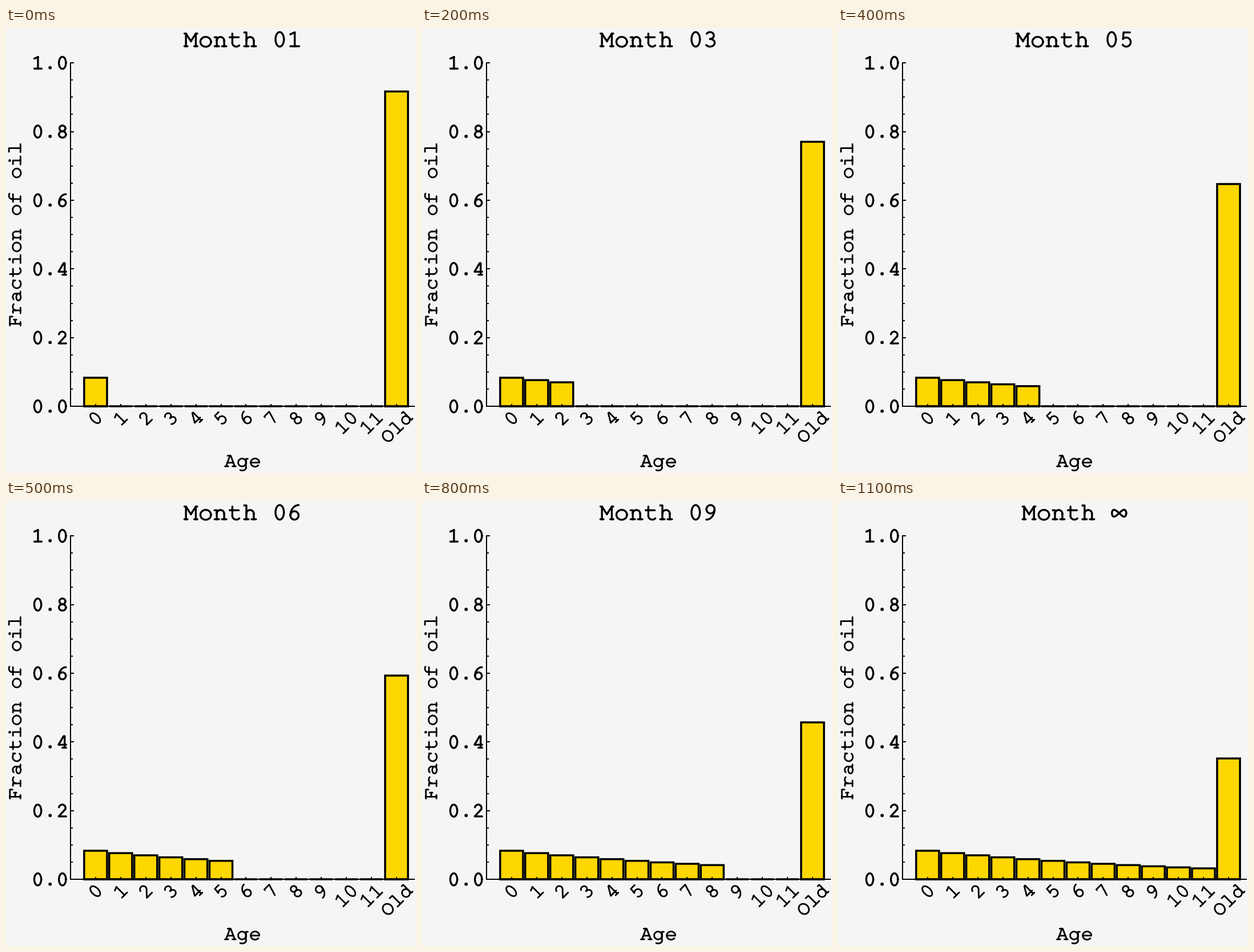
A matplotlib script for the animation above (2100 ms loop, 718x780 px).

```python
import numpy as np
import matplotlib.pyplot as plt
from matplotlib.animation import FuncAnimation
from matplotlib.patches import PathPatch, Rectangle
from matplotlib.path import Path

W, H, DPI = 718, 780, 100
PX = 72 / DPI
INK, GOLD, PAPER = "black", "#ffd700", "#f5f5f5"
LEFT, RIGHT, TOP, BASE = 113, 716, 61.1, 663.2
FIRST, STEP, HALF, EDGE = 156.9, 43.92, 20.05, 3.5
MID = (LEFT + RIGHT) / 2
MONTHS = 12
KEEP = 11 / 12

# Typewriter lettering: one round pen, stems, slabs and ellipse arcs.
# Units are 1/100 em; every cell is 60 wide.
CELL, MIDDLE = 60, 30
FOOT, XH, CAP, ASC = 3.5, 40, 55, 59.5


def line(*pts):
    return [np.array(pts, float)]


def slab(x0, x1, y=FOOT):
    return line((x0, y), (x1, y))


def arc(cx, cy, rx, ry, start=0, stop=360):
    t = np.radians(np.linspace(start, stop, 49))
    return [np.column_stack([cx + rx * np.cos(t), cy + ry * np.sin(t)])]


def stem(x, top, flag=9, foot=9):
    """Upright with a flag to the left of its top and a slab foot."""
    return line((x - flag, top), (x, top), (x, FOOT)) + slab(x - foot, x + foot)


def arch():
    return arc(MIDDLE, 26, 15, 15, 180, 0) + stem(45, 26, 0)


def half_turn(strokes):
    return [np.array([CELL, 63]) - s for s in strokes]


def infinity():
    t = np.linspace(0, 2 * np.pi, 97)
    return [np.column_stack([35 + 29 * np.cos(t), 28 + 14 * np.sin(2 * t)])]


six = arc(MIDDLE, 19, 16.5, 17) + arc(47, 19, 33.5, 42, 180, 90)
digits = {
    "0": arc(MIDDLE, 31.5, 17, 29.5),
    "1": stem(31, 60, 0, 18) + line((13, 52), (31, 60)),
    "2": arc(29, 45, 16, 16, 170, -40) + line((41, 35), (12, FOOT), (48, FOOT)),
    "3": arc(28, 47, 15.5, 14, 150, -90) + arc(28, 17.5, 19, 15.5, 90, -145),
    "4": line((41, FOOT), (41, 60), (36, 60), (11, 18), (48, 18)) + slab(MIDDLE, 48),
    "5": line((44, ASC), (18, ASC), (16, 33)) + arc(29, 20.5, 18, 18.5, 135, -145),
    "6": six,
    "7": line((13, CAP), (13, ASC), (47, ASC), (MIDDLE, FOOT)),
    "8": arc(MIDDLE, 47, 14.5, 14) + arc(MIDDLE, 17.5, 17, 15.5),
    "9": half_turn(six),
}

half_m = stem(10, CAP, 6, 6.5) + line((10, CAP), (MIDDLE, 24))
mirror = [s * [-1, 1] + [CELL, 0] for s in half_m]
capitals = {
    "M": half_m + mirror,
    "A": line((17, CAP), (32, CAP), (51, FOOT)) + line((28, CAP), (9, FOOT))
         + slab(16, 45, 21) + slab(FOOT, 20) + slab(40, 56),
    "F": stem(16, CAP) + line((16, CAP), (51, CAP), (51, 42))
         + slab(16, 36, 29) + line((36, 36), (36, 23)),
    "O": arc(MIDDLE, 29, 23, 26.5),
}

small = {
    "a": arc(27, 28, 16, 13, 140, 0) + line((43, 28), (43, FOOT), (53, FOOT))
         + arc(26, 13, 17, 11),
    "c": arc(MIDDLE, 21.5, 21, 20, 35, 320) + line((47, XH), (47, 29)),
    "d": arc(27, 21.5, 18.5, 19.5) + line((36, ASC), (46, ASC), (46, FOOT), (55, FOOT)),
    "e": arc(MIDDLE, 21.5, 21, 20, 0, 320) + slab(9, 51, 21.5),
    "f": stem(23, 46, 0, 14) + arc(40, 46, 17, 13.5, 180, 55) + slab(9, 47, XH),
    "g": arc(27, 22, 19, 19) + line((CAP, XH), (46, XH), (46, -3))
         + arc(28, -3, 18, 14, 0, -125),
    "h": stem(15, ASC) + arch(),
    "i": stem(31, XH, 18, 20) + arc(MIDDLE, 56, 2.5, 2.5),
    "l": stem(31, ASC, 18, 20),
    "n": stem(15, XH) + arch(),
    "o": arc(MIDDLE, 21.5, 21.5, 20),
    "r": stem(21, XH, 12, 14) + arc(39, 24, 18, 17, 180, 45),
    "t": line((18, CAP), (18, 17)) + arc(34, 17, 16, 15, 180, 320) + slab(7, 44, XH),
}

glyph = {" ": [], ".": arc(MIDDLE, 8, 3.5, 3.5), "∞": infinity(),
         **digits, **capitals, **small}


def advance(ch):
    return 70 if ch == "∞" else CELL


def lettering(text, x, y, size, angle=0, lift=0.0):
    """Path of a word centred on x; lift is the height in the glyph that sits on y."""
    a = np.radians(angle)
    turn = np.array([[np.cos(a), -np.sin(a)], [-np.sin(a), -np.cos(a)]])
    pen = -sum(map(advance, text)) / 2
    paths = []
    for ch in text:
        for stroke in glyph[ch]:
            local = (stroke + [pen, -lift]) * size / 100
            paths.append(Path(local @ turn.T + [x, y]))
        pen += advance(ch)
    return Path.make_compound_path(*paths)


fig = plt.figure(figsize=(W / DPI, H / DPI), dpi=DPI, facecolor=PAPER)
ax = fig.add_axes([0, 0, 1, 1])
ax.set_xlim(0, W)
ax.set_ylim(H, 0)
ax.axis("off")


def write(text, x, y, size=36, angle=0, lift=0.0, weight=0.078):
    patch = PathPatch(lettering(text, x, y, size, angle, lift), fill=False,
                      edgecolor=INK, lw=size * weight * PX, snap=False,
                      capstyle="round", joinstyle="round")
    return ax.add_patch(patch)


def rule(x0, y0, x1, y1, width=2):
    ax.plot([x0, x1], [y0, y1], color=INK, lw=width * PX,
            solid_capstyle="butt", zorder=4)


def level(v):
    return BASE - v * (BASE - TOP)


# Axes, ticks and labels
rule(LEFT, TOP - 1, LEFT, BASE + 1)
rule(LEFT - 1, BASE, RIGHT, BASE)
for k in range(21):
    y = level(k / 20)
    major = k % 4 == 0
    rule(LEFT, y, LEFT + (6 if major else 4), y)
    if major:
        write(f"{k / 20:.1f}", 77.2, y, lift=31.5, weight=0.093)

bars = []
for k in range(MONTHS + 1):
    x = FIRST + k * STEP
    label = "Old" if k == MONTHS else str(k)
    rule(x, BASE, x, BASE - 4.5)
    rule(x - HALF, BASE, x + HALF, BASE, EDGE)
    write(label, x - 0.5, 684 + 7.64 * (len(label) - 1), angle=45, lift=31)
    box = Rectangle((x - HALF, BASE), 2 * HALF, 0, facecolor=GOLD,
                    edgecolor=INK, lw=EDGE * PX, zorder=3, snap=False)
    bars.append(ax.add_patch(box))

write("Fraction of oil", 26.6, (TOP + BASE) / 2, angle=90)
write("Age", MID, 769.5)
title = write("Month 01", MID, 33.5, 43.2)


def draw(i):
    month = min(i + 1, MONTHS)
    name = "∞" if month == MONTHS else f"{month:02d}"
    title.set_path(lettering("Month " + name, MID, 33.5, 43.2))
    for k, box in enumerate(bars):
        if k == MONTHS:
            share = KEEP ** month
        else:
            share = KEEP ** k / MONTHS if k < month else 0
        box.set_height(level(share) - BASE)
        box.set_visible(share > 0)
    return [title, *bars]


anim = FuncAnimation(fig, draw, frames=21, interval=100, repeat=True, blit=False)
plt.show()
```
